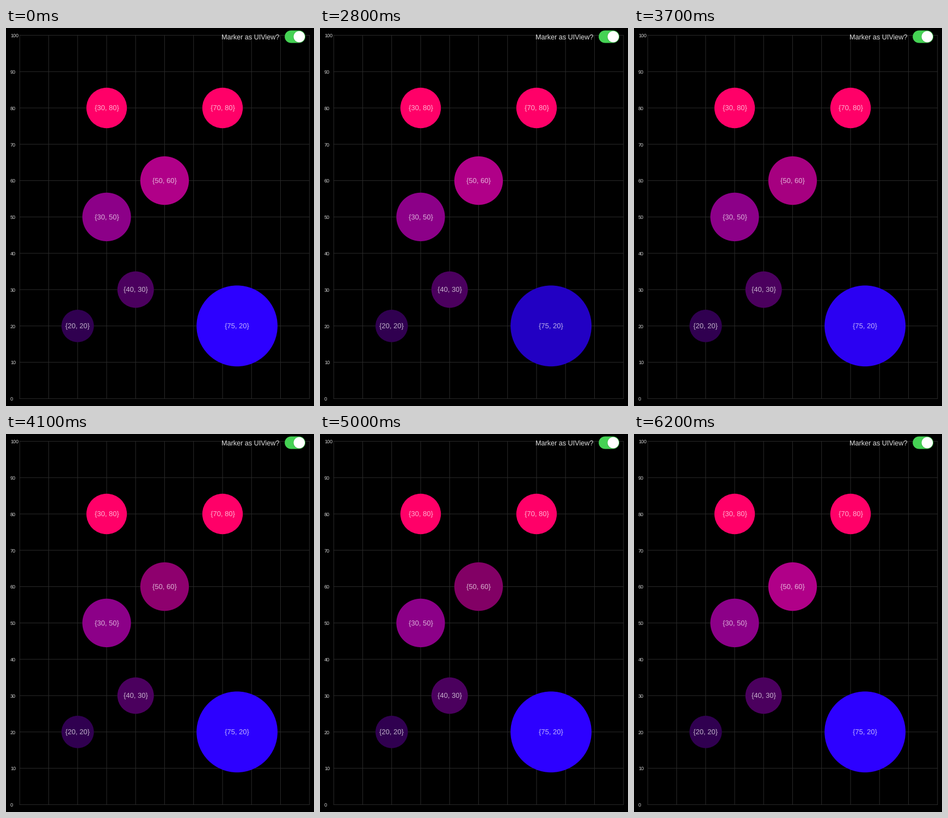
A matplotlib script that plays this animation: 566x695 px, repeating every 6.7 s.

```python
import matplotlib.pyplot as plt
import numpy as np
from matplotlib.animation import FuncAnimation
from matplotlib.patches import Circle

W, H, DPI = 566, 695, 100
PX = 72 / DPI  # one pixel in points
STEP, LOOP = 100, 6700
LEFT, TOP, DX, DY = 25.2, 13.4, 53.25, 66.8
UNIT = 7.44  # bubble radius in pixels per size unit

# A tap dims a bubble while it is held down
DIM, FADE_OUT, FADE_IN = 0.52, 200, 340

# x, y, size, rgb, taps as (press, release) in ms
BUBBLES = [
    (30, 80, 5, (255, 0, 104), []),
    (70, 80, 5, (255, 0, 104), []),
    (50, 60, 6, (176, 0, 136),
     [(3658, 3900), (4272, 4830), (5190, 5340), (5680, 5850)]),
    (30, 50, 6, (140, 0, 136), []),
    (40, 30, 4.5, (75, 0, 94), []),
    (20, 20, 4, (48, 0, 80), []),
    (75, 20, 10, (45, 0, 255), [(2190, 2620), (3040, 3425), (4190, 4500)]),
]

plt.rcParams["font.family"] = "Liberation Sans"
plt.rcParams["text.hinting"] = "none"
fig = plt.figure(figsize=(W / DPI, H / DPI), dpi=DPI, facecolor="black")
ax = fig.add_axes([0, 0, 1, 1])
ax.set_xlim(0, W)
ax.set_ylim(H, 0)
ax.axis("off")


def smooth(u):
    u = np.clip(u, 0, 1)
    return u * u * (3 - 2 * u)


def brightness(t, taps):
    held = sum(smooth((t - press) / FADE_OUT)
               * (1 - smooth((t - release) / FADE_IN))
               for press, release in taps)
    return 1 - DIM * min(held, 1)


def rgb(color, level=1.0):
    return tuple(c * level / 255 for c in color)


def pos(x, y):
    return LEFT + x / 10 * DX, TOP + (100 - y) / 10 * DY


def label(x, y, text, px, color, ha="left", **kw):
    """Text whose digits are centred vertically on y."""
    ax.text(x, y + 0.355 * px, text, fontsize=px * PX, color=color,
            ha=ha, va="baseline", **kw)


def draw_grid():
    right, bottom = pos(100, 0)
    style = dict(color="#2b2b2b", lw=PX, snap=False, zorder=1)
    for i in range(11):
        x, y = pos(10 * i, 10 * i)
        ax.plot([x, x], [TOP, bottom], **style)
        ax.plot([LEFT, right], [y, y], **style)
        label(8, y + 0.6, str(10 * i), 9, "#d8d8d8", zorder=4)


def draw_switch():
    label(396.5, 16, "Marker as UIView?", 12.6, "#e2e2e2", zorder=4)
    ax.plot([523.6, 538.6], [16, 16], color="#45d254", lw=23 * PX,
            solid_capstyle="round", snap=False, zorder=4)
    ax.add_patch(Circle((538.7, 16.4), 10.8, fc="black", ec="none",
                        alpha=.18, zorder=5))
    ax.add_patch(Circle((538.8, 16), 10.3, fc="white", ec="none", zorder=6))


def draw_bubbles():
    tapped = []
    for x, y, size, color, taps in BUBBLES:
        center = pos(x, y)
        disc = Circle(center, size * UNIT, fc=rgb(color), ec="none", zorder=2)
        ax.add_patch(disc)
        label(*center, f"{{{x}, {y}}}", 13, "white", ha="center",
              alpha=.7, zorder=3)
        if taps:
            tapped.append((disc, color, taps))
    return tapped


draw_grid()
draw_switch()
tapped = draw_bubbles()


def update(frame):
    for disc, color, taps in tapped:
        disc.set_facecolor(rgb(color, brightness(frame * STEP, taps)))
    return [disc for disc, _, _ in tapped]


anim = FuncAnimation(fig, update, frames=LOOP // STEP, interval=STEP,
                     repeat=True, repeat_delay=0, blit=False)
plt.show()
```
